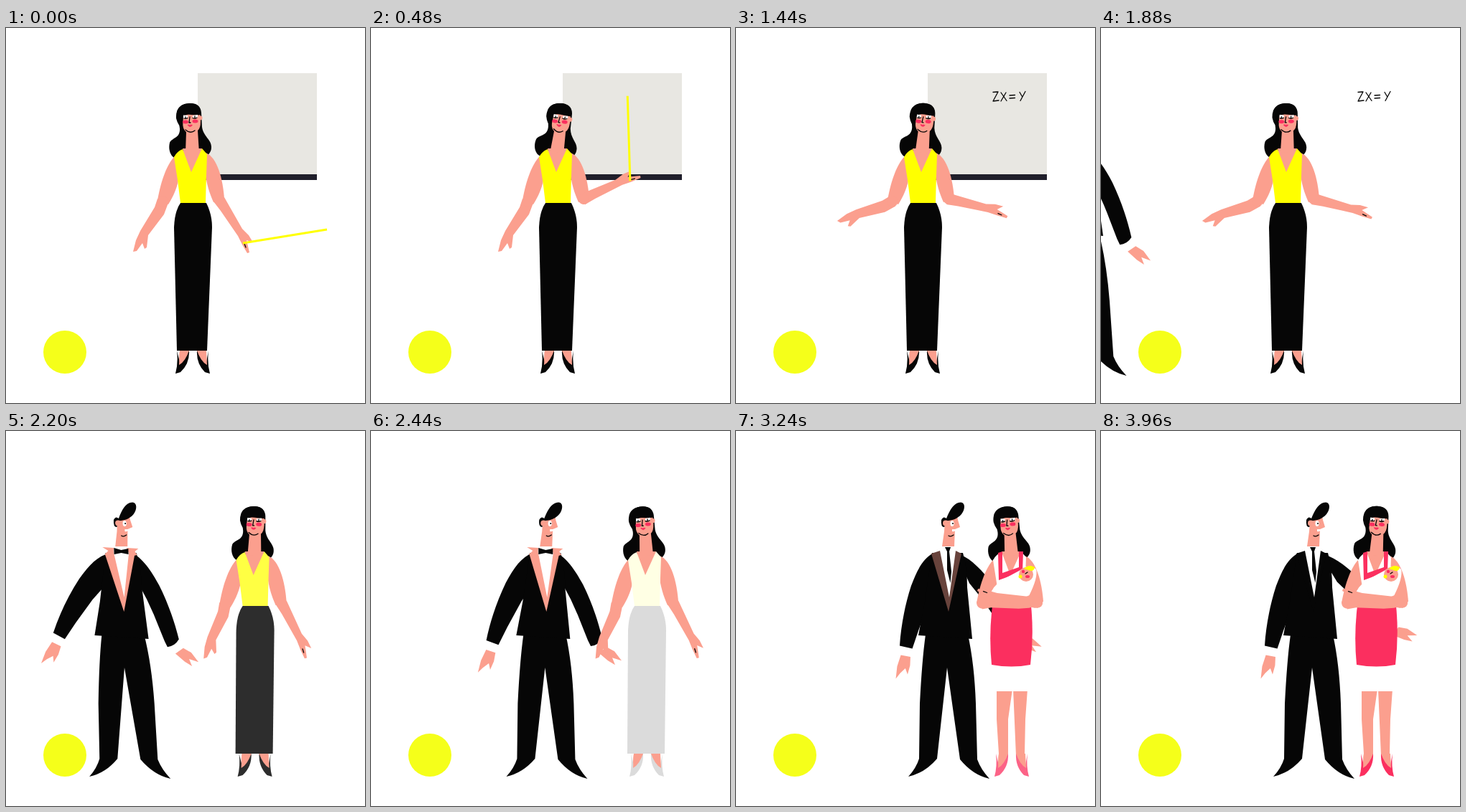
Write an HTML page that moves like this. It is 500 px wide and 523 px high and loops after 4000 ms.

```html
<!DOCTYPE html>
<html lang="en">
<head>
<meta charset="utf-8">
<title>Teacher, wedding, family</title>
<style>
  html, body { margin: 0; width: 100%; height: 100%; overflow: hidden; background: #fff; }
  svg { display: block; width: 100vw; height: 100vh; }
  .skin { fill: #fb9f8e; }
  .ink { fill: #060606; }
  .white { fill: #fff; }
  .pink { fill: #fb2f5f; }
  .yellow { fill: #ff0; }
  .line { fill: none; stroke: #060606; stroke-width: 1.3; stroke-linecap: round; stroke-linejoin: round; }
</style>
</head>
<body>
<svg viewBox="0 0 500 523" xmlns="http://www.w3.org/2000/svg">
  <g id="board">
    <path fill="#e8e7e2" d="M267 63H433V204H267Z"/>
    <path fill="#201f2b" d="M267 204H433V212H267Z"/>
  </g>
  <g id="sum" class="line">
    <path pathLength="1" d="M358 89.500L365 89L358 102L366 101"/>
    <path pathLength="1" d="M369 90L377 101.500"/>
    <path pathLength="1" d="M376 90L369 102"/>
    <path pathLength="1" d="M381 94L388.500 93.500"/>
    <path pathLength="1" d="M381 98L388.500 97.500"/>
    <path pathLength="1" d="M395 89.500L398.500 95.500"/>
    <path pathLength="1" d="M403 88.500L396 101.500"/>
  </g>

  <circle cx="82" cy="452" r="30" fill="#f5ff1a"/>

  <g id="man">
    <g id="manArmR">
      <path class="skin" d="M318 309L329 301L340 307L350 320L337 316L341 326L331 320Z"/>
      <path class="white" d="M306 302L323 292L327 299L313 309Z"/>
      <path class="ink" d="M258 170C273 176 285 194 296 214C308 238 317 264 323 289Q317 299 307 300L303 292L289 257Q280 235 268 214Z"/>
    </g>
    <g id="manArmL">
      <path class="skin" d="M163 306L176 310L174 322L169 334L167 325L159 331L152 338L156 321Z"/>
      <path class="white" d="M163 290L182 296L179 309L162 304Z"/>
      <path class="ink" d="M226 170C210 176 200 191 189 212C177 238 168 266 163 293L180 299L192 274L211 238L228 212Z"/>
    </g>
    <path class="ink" d="M213 284H272Q281 325 283 380L285 458Q290 472 302 485Q279 480 261 458L243 330L229 457Q212 477 189 482Q200 470 204 457L205 380Q208 320 213 284Z"/>
    <path class="ink" d="M222 170H265Q271 190 271 218L278 290L203 285L212 238Z"/>
    <path class="white" d="M235 160H253L260 174L246 236L231 174Z"/>
    <path id="wings" class="skin" d="M218 162L234 163L232 175L222 171L226 167ZM252 163L268 164L263 168L266 173L256 175Z"/>
    <path id="lapel" d="M221 171L233 167L246 232L255 167L263 171L245 252Z"/>
    <path class="skin" d="M240 123L257 118L258 124L261 134L254 137L253 161H236L239 140Z"/>
    <path class="ink" d="M242 122C247 110 252 100 262 99.500C269 100 268 110 263 116C257 123 249 125 243 125L239 134Q234 134 235 124Q238 118 242 122Z"/>
    <circle class="skin" cx="241" cy="128.500" r="4"/>
    <ellipse class="white" cx="250" cy="129" rx="2.600" ry="4"/>
    <circle class="ink" cx="251" cy="129" r="1"/>
    <path class="white" d="M250 137H255Q254 141 250 140Z"/>
    <path class="line" d="M245 146Q248 148 252 145"/>
    <path id="bow" class="ink" d="M234 163L244 166L254 164V172L244 170L234 172Z"/>
    <path id="tie" class="ink" d="M240 162H248L246 168L249 196L247.500 212L243 194L243 168Z"/>
  </g>

  <g id="woman">
    <g class="head">
      <path class="ink" d="M238 116Q242 105 257 105Q271 106 272 118L273 138C275 152 287 156 286 167C286 173 281 179 274 182L236 182C228 178 226 168 228 160C231 153 243 154 242 140Z"/>
    </g>
    <path class="skin" d="M239 360H261L255 402V453L242 472Q240 462 242 450L239 402ZM262 360H282L279 402L278 450Q280 462 278 472L266 453Z"/>
    <path class="shoe" d="M238 450L242 466Q251 462 255 450Q256 468 243 480L236 482Q240 468 238 450ZM282 450L279 466Q270 462 266 450Q265 468 277 480L284 482Q280 468 282 450Z"/>
    <path class="skin" d="M242 450H254Q251 464 241 470ZM267 450H279L280 470Q270 464 267 450Z"/>
    <path id="skirt"/>
    <g class="skin">
      <path d="M238 176C224 188 216 213 211 240L226 246C233 235 240 220 241 205Z"/>
      <path d="M278 174C294 180 302 210 304 238L289 243C283 230 279 215 278 205Z"/>
      <path d="M246 168H273L266 203H252Z"/>
    </g>
    <g class="head">
      <path class="skin" d="M246 114H270L271 130Q271 140 267 143L269 174H250L251 145Q246 141 246 132Z"/>
      <circle class="skin" cx="270.500" cy="125.500" r="3"/>
      <path class="ink" d="M237 126C236 112 244 105 257 105C267 105 272 110 271 121C262 123 255 118 247 123L246 138Q240 138 237 126Z"/>
      <path class="white" d="M247 121.500L253 122V126H247ZM260 122L267 121V125H260Z"/>
      <path class="line" stroke-width="1" d="M248 126Q250 127 253 125.500M260 125.500Q263 127 266 125M250 124V126M263 123V125M256 124L255 132L257 132M250 142Q257 148 263 143"/>
      <g class="pink">
        <ellipse cx="250" cy="131" rx="4" ry="2.500"/>
        <ellipse cx="263.500" cy="130" rx="4" ry="2.500"/>
        <path d="M252.500 135L255 134.500L256 135.500L257 134.500L260 135Q257 141 252.500 135Z"/>
      </g>
    </g>
    <path id="top" d="M246 169L258 201L273 168L280 176L279 205L278 244H243L239 212L234 180Q238 172 246 169Z"/>
    <g id="apron" class="pink">
      <path d="M241 170L247 168V198L270 190V168H276L275 196L242 208Z"/>
      <path d="M233 244H287Q291 285 286 326Q260 331 232 326Q228 285 233 244Z"/>
    </g>
    <g id="baby">
      <path class="white" d="M229 230Q234 216 246 208L272 194Q286 184 294 193Q297 204 284 230Z"/>
      <circle class="skin" cx="280" cy="200" r="10"/>
      <path class="yellow" d="M277 192Q284 185 292 190Q291 196 286 195Z"/>
      <circle class="yellow" cx="272" cy="203" r="2.500"/>
      <g class="pink"><circle cx="276" cy="196" r="2.200"/><ellipse cx="282" cy="203" rx="3" ry="2"/></g>
      <path class="line" d="M279 199L282 197"/>
    </g>
    <g id="foreL" class="skin">
      <path d="M211 238L207 250L187 283L181 296L177 312L182 311L190 300L193 308L196 306L198 289L220 260L226 244Z"/>
      <circle cx="218.500" cy="242" r="7.500"/>
    </g>
    <g id="foreR">
      <path class="skin" d="M304 236L329 280L338 289L344 299L335 296L339 313L336 314L329 302L323 290L299 255L289 242Z"/>
      <circle class="skin" cx="296.500" cy="239" r="7.500"/>
      <path class="line" d="M332 301L334 306"/>
    </g>
    <path id="stick" fill="none" stroke="#ff0" stroke-width="3" d="M330 300L447 281"/>
  </g>
</svg>
<script>
const LOOP = 4000, STEP = 40;
const $ = id => document.getElementById(id);
const heads = document.querySelectorAll('.head');
const shoe = document.querySelector('.shoe');
const strokes = [...$('sum').children];

const SKIN = [251, 159, 142], INK = [6, 6, 6], WHITE = [255, 255, 255];
const YELLOW = [255, 255, 0], PINK = [251, 47, 95];

const clamp = v => Math.max(0, Math.min(1, v));
const ramp = (t, a, b) => clamp((t - a) / (b - a));
const ease = p => (1 - Math.cos(Math.PI * p)) / 2;
const mix = (a, b, p) => `rgb(${a.map((v, i) => Math.round(v + (b[i] - v) * p))})`;
const put = (el, name, value) => el.setAttribute(name, value);
const show = (id, p) => put($(id), 'opacity', p);
const turn = (id, angle, x, y) => put($(id), 'transform', `rotate(${angle} ${x} ${y})`);

// Eased value between [time, value] keys.
function key(t, ...keys) {
  let [t0, v0] = keys[0];
  for (const [t1, v1] of keys) {
    if (t < t1) return v0 + (v1 - v0) * ease(ramp(t, t0, t1));
    [t0, v0] = [t1, v1];
  }
  return v0;
}

function drawLesson(t) {
  show('board', 1 - ramp(t, 1600, 1840));
  show('sum', 1 - ramp(t, 1900, 2100));
  const written = ramp(t, 520, 920) * strokes.length;
  strokes.forEach((s, i) => {
    const p = clamp(written - i);
    put(s, 'stroke-dasharray', `${p} 2`);
    put(s, 'visibility', p ? 'visible' : 'hidden');
  });
}

function drawWoman(t) {
  put($('woman'), 'transform', `translate(${key(t, [1880, 0], [2388, 124])} 0)`);
  const tilt = key(t, [0, 0], [500, 9], [1000, 10], [1880, 2], [2200, 3], [2500, -3], [3240, -3], [3700, 5]);
  heads.forEach(h => put(h, 'transform', `rotate(${tilt} 260 170)`));

  const right = key(t, [80, 0], [500, -83], [880, -66], [1000, -72], [1500, -43],
    [1900, -43], [2180, 5], [2880, 4], [3160, 131]);
  const left = key(t, [1000, 0], [1400, 40], [1900, 40], [2180, -9], [2880, -9], [3160, -119]);
  turn('foreR', right, 296, 239);
  turn('foreL', left, 218, 241);

  // The pointer follows the hand until it is tossed up.
  const toss = Math.max(0, t - 1000) * 0.9;
  put($('stick'), 'transform', `translate(0 ${-toss}) rotate(${toss ? -72 : right} 296 239)`);
  show('stick', t < 1300 ? 1 : 0);

  const bride = ramp(t, 2146, 2490), pinkShoe = ramp(t, 3000, 3320);
  put($('top'), 'fill', mix(YELLOW, WHITE, ramp(t, 2100, 2480)));
  put($('skirt'), 'fill', mix(INK, WHITE, bride));
  put(shoe, 'fill', t < 2500 ? mix(INK, WHITE, bride) : mix(WHITE, PINK, pinkShoe));

  const hem = key(t, [2900, 450], [3200, 363]);
  const flare = key(t, [1960, 0], [2200, 5]);
  put($('skirt'), 'd', `M243 244H279Q287 260 287 278L${280 + flare} ${hem}H${238 - flare}L234 278Q235 255 243 244Z`);

  show('apron', ramp(t, 2960, 3160));
  const fall = ramp(t, 2880, 3160);
  put($('baby'), 'transform', `translate(0 ${-215 * (1 - fall)})`);
  show('baby', fall ? 1 : 0);
}

function drawMan(t) {
  const x = key(t, [1580, -360], [2462, 0], [2880, 0], [3200, 51]);
  const lean = key(t, [1580, -20], [2200, -13], [2462, 0]) / 382;
  put($('man'), 'transform', `matrix(1 0 ${-lean} 1 ${x + lean * 482} 0)`);
  turn('manArmL', key(t, [2200, 9.5], [2500, 0], [2880, 0], [3240, -7]), 224, 182);
  turn('manArmR', key(t, [1880, 3], [2200, 1.5], [2500, 0], [2880, 0], [3200, -11], [3240, -11], [3560, -18.5]), 262, 182);

  const suit = ramp(t, 3000, 3400);
  put($('lapel'), 'fill', mix(SKIN, INK, suit));
  show('wings', 1 - ramp(t, 3000, 3160));
  show('bow', 1 - ramp(t, 3000, 3160));
  show('tie', ramp(t, 3000, 3160));
}

function draw(t) {
  drawLesson(t);
  drawWoman(t);
  drawMan(t);
}

const start = performance.now();
function tick() {
  const t = (performance.now() - start) % LOOP;
  draw(Math.floor(t / STEP) * STEP);
  requestAnimationFrame(tick);
}
tick();
</script>
</body>
</html>
```
